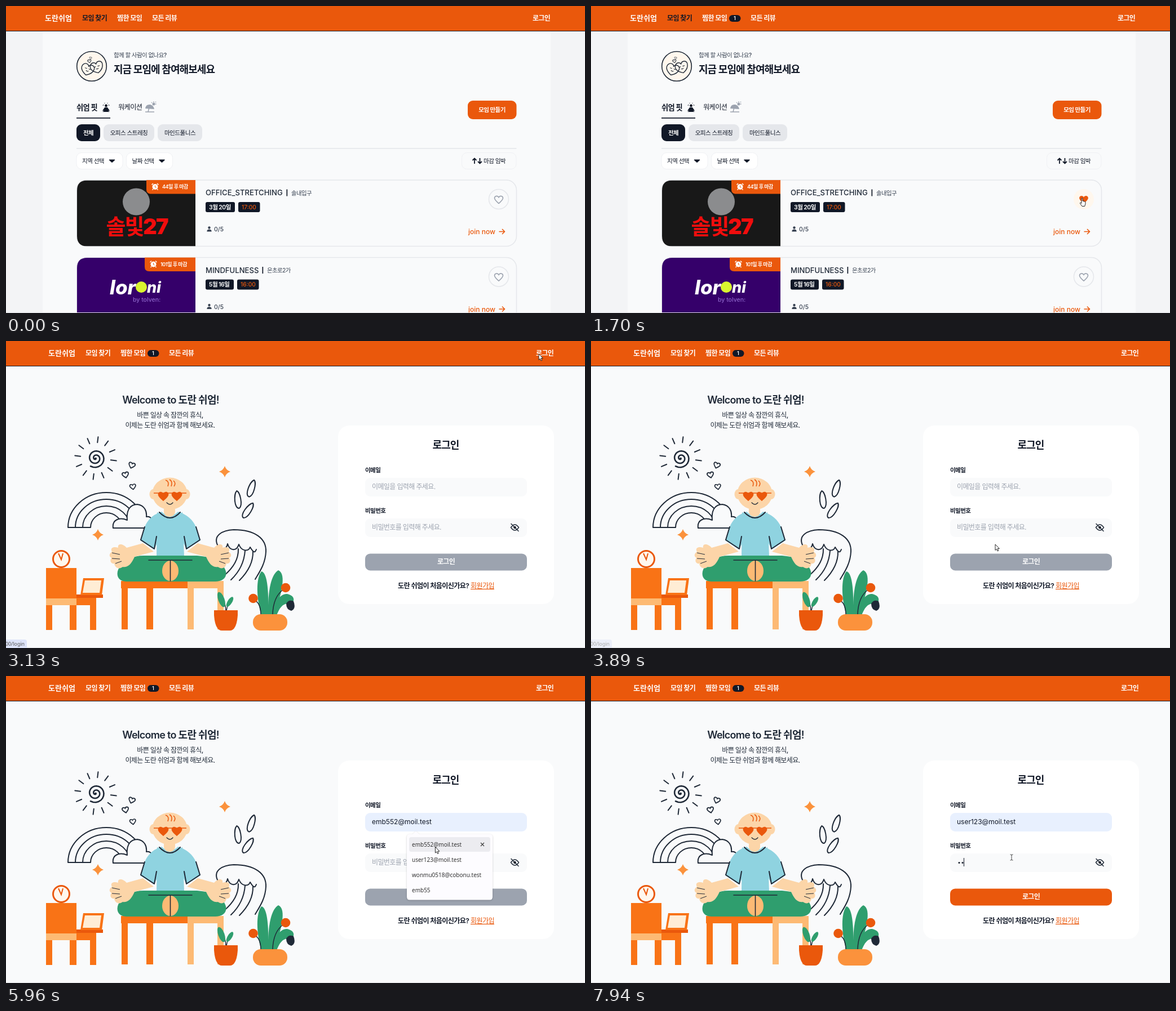
These frames come from a looping animation (1027x545 px, 8000 ms). An HTML page:

```html
<!DOCTYPE html>
<html lang="ko">
<head>
<meta charset="utf-8">
<style>
html, body { margin: 0; width: 100%; height: 100%; overflow: hidden; background: #f9fafb }
svg { display: block; width: 1027px; height: 545px }
text { font-family: Inter, "Noto Sans CJK KR", "Noto Sans CJK", sans-serif; white-space: pre }
.ui { font-family: "Noto Sans", sans-serif }
.line { fill: none; stroke: #1f2937; stroke-width: 2; stroke-linecap: round; stroke-linejoin: round }
</style>
</head>
<body>
<svg id="stage" viewBox="0 0 1027 545"></svg>
<script>
const INK = '#111827', ORANGE = '#ea580c', PALE = '#f9fafb', GREY = '#9ca3af', RULE = '#e5e7eb';
const SKIN = '#fcd5a8', GREEN = '#2f9e6e', AMBER = '#f97316', SAND = '#fdba74';
const LOOP = 8000;

// y is the optical middle of the line
const text = (x, y, size, str, fill = INK, weight = 500, extra = '') =>
  `<text x="${x}" y="${y + size * .36}" font-size="${size}" font-weight="${weight}" fill="${fill}"
    ${/[가-힣]/.test(str) ? `letter-spacing="${/Welcome/.test(str) ? -.04 : -.052}em"` : ''} ${extra}>${str}</text>`;
const mid = 'text-anchor="middle"';
const box = (x, y, x2, y2, r, fill, extra = '') =>
  `<rect x="${x}" y="${y}" width="${x2 - x}" height="${y2 - y}" rx="${r}" fill="${fill}" ${extra}/>`;
const disc = (x, y, r, fill, extra = '') => `<circle cx="${x}" cy="${y}" r="${r}" fill="${fill}" ${extra}/>`;
const oval = (x, y, rx, ry, fill, turn = 0) =>
  `<ellipse rx="${rx}" ry="${ry}" fill="${fill}" transform="translate(${x} ${y}) rotate(${turn})"/>`;
const path = (d, fill, extra = '') => `<path d="${d}" fill="${fill}" ${extra}/>`;
const line = (d, extra = '') => `<path class="line" d="${d}" ${extra}/>`;
const group = (id, body, extra = '') => `<g id="${id}" ${extra}>${body}</g>`;
const at = (x, y, body, more = '') => `<g transform="translate(${x} ${y}) ${more}">${body}</g>`;

const HEART = 'M0 6.5C-4 3-7.5 0-7.5-3C-7.5-7-2-8 0-4.3C2-8 7.5-7 7.5-3C7.5 0 4 3 0 6.5Z';
const heart = (x, y, scale, turn, extra) =>
  at(x, y, `<path d="${HEART}" ${extra}/>`, `rotate(${turn}) scale(${scale})`);
const outline = `fill="none" stroke="#1f2937" stroke-width="2.4"`;

function header() {
  return box(0, 0, 1027, 44, 0, ORANGE) + box(0, 44, 1027, 45, 0, INK) + group('nav',
    text(69, 21, 13, '도란쉬엄', '#fff', 900, 'style="letter-spacing:0"') +
    text(135, 22, 12, '모임 찾기', INK, 600, 'id="current"') +
    text(197, 22, 12, '찜한 모임', '#fff', 600) +
    group('count', box(245, 16, 265.5, 28, 6, INK) + text(255, 22, 9, '1', '#fff', 600, mid)) +
    group('reviews', text(259, 22, 12, '모든 리뷰', '#fff', 600)) +
    text(934, 22, 12, '로그인', '#fff', 600));
}

function alarm(x, y) {
  return at(x, y, disc(0, .5, 5, '#fff') + path('M-6-3L-3.5-5.5M6-3L3.5-5.5M-3.5 4.5L-5 6M3.5 4.5L5 6', 'none',
    'stroke="#fff" stroke-width="1.5"') + path('M0-2V1L2 2', 'none', `stroke="${ORANGE}"`));
}

function card(y, clip, art, badgeX, days, title, barX, place, date, hour, chipX, heartId) {
  return at(0, y,
    box(125.5, .5, 905.5, 118, 18, PALE, `stroke="${RULE}" stroke-width="1.5"`) +
    `<clipPath id="${clip}"><path d="M336 1H144Q126 1 126 19V100Q126 118 144 118H336Z"/></clipPath>` +
    `<g clip-path="url(#${clip})">${art}</g>` +
    path(`M336 .5V25H${badgeX + 8}Q${badgeX} 25 ${badgeX} 17V.5Z`, ORANGE) +
    alarm(badgeX + 15.5, 12) + text(badgeX + 28, 12.5, 9, days, '#fff', 600) +
    text(354, 23, 13.1, title, '#1f2937') +
    box(barX, 17, barX + 1.7, 29, 0, INK) + text(barX + 8.5, 23.5, 10.4, place, '#374151', 400) +
    box(354, 39.5, chipX - 6, 57.5, 3, INK) + text(360, 48.5, 10.5, date, '#fff', 600) +
    box(chipX, 39.5, chipX + 38.5, 57.5, 3, INK) + text(chipX + 6, 48.5, 10.2, hour, ORANGE) +
    disc(360.5, 85, 2.2, '#374151') + path('M356.5 92V90.5Q357 88 360.5 88T364.5 90.5V92Z', '#374151') +
    text(369, 88, 10.5, '0/5', '#374151') +
    text(820, 92.5, 12, 'join now', ORANGE) +
    path('M874.5 92H884M880 87.5L884.5 92L880 96.5', 'none', `stroke="${ORANGE}" stroke-width="1.5"`) +
    group(heartId, disc(874, 34.5, 17.5, PALE, `stroke="${RULE}" stroke-width="1.5"`) +
      heart(874, 35.5, 1, 0, `fill="none" stroke="${GREY}" stroke-width="1.6"`)));
}

function avatar() {
  const face = (x, y, turn) => at(x, y,
    line('M0 11C-8 7-13 2-11-4C-8-11-1-9 0-5C3-11 11-9 11-3C11 3 6 8 0 11Z', 'style="stroke-width:1.4"') +
    line('M-5-1Q-3.5 0-2-1M2-1Q3.5 0 5-1M-2 3Q0 5 2 3', 'style="stroke-width:1"'), `rotate(${turn})`);
  return disc(152, 107, 26.3, '#fff7ed', 'stroke="#1f2937" stroke-width="1.6"') +
    face(145, 112, 18) + face(161, 108, -16) +
    heart(148, 98, .42, -12, outline) + heart(150, 92.5, .28, 12, outline);
}

function listPage() {
  const shipArt = box(126, 0, 336, 119, 0, '#181818') + disc(231, 39, 24, '#8b8c8e') +
    text(232, 83, 38, '솔빛27', '#f00d0d', 900, mid);
  const boltArt = box(126, 0, 336, 119, 0, '#35006a') +
    text(184, 53, 35, 'lor', '#fff', 800, 'font-style="italic"') + disc(240, 53, 10, '#d9f52f') +
    text(250, 53, 27, 'ni', '#fff', 800, 'font-style="italic"') + text(225, 75.5, 10.5, 'by tolven:', '#8c62c9');
  const caretDown = x => path(`M${x - 4.5} 273.2H${x + 4.5}L${x} 277.2Z`, INK, `stroke="${INK}" stroke-width="1.6" stroke-linejoin="round"`);
  const select = (x, label) => box(x, 260.5, x + 82, 289.5, 9, '#fff', 'stroke="#f0f1f4"') +
    text(x + 10, 275, 10.6, label) + caretDown(x + 63);
  return box(0, 45, 1027, 545, 0, '#f3f4f6') + box(65, 45, 966, 545, 0, PALE) + avatar() +
    text(191, 87, 10.5, '함께 할 사람이 없나요?', '#374151') +
    text(191, 113, 18, '지금 모임에 참여해보세요', INK, 600) +
    text(125, 180, 13.2, '쉬엄 핏', INK, 600) + box(125, 198, 185, 199.7, 0, INK) +
    // meditating figure
    disc(177.5, 177, 2.4, INK) + path('M175 180H180L184 186H181L184 188H171L174 186H171Z', INK) +
    path('M172 177L173 175M175 173V172M180 173V172M183 177L182 175', 'none', `stroke="${INK}"`) +
    text(199, 180, 12.2, '워케이션') +
    // beach parasol
    path('M247 182Q248 174 256 175Q262 177 263 183Z', GREY) + disc(262, 174, 2.5, GREY) +
    path('M254 180L252 188M247 188H263M262 169.5V171M266.5 174H265M258 171L259 172M266 170L265 171', 'none', `stroke="${GREY}" stroke-width="1.5"`) +
    box(819, 168, 905.5, 201, 9, ORANGE) + text(862, 184.5, 10.5, '모임 만들기', '#fff', 600, mid) +
    box(125, 210, 167, 240, 9, INK) + text(146, 225, 10.5, '전체', '#fff', 600, mid) +
    box(173, 210, 263, 240, 9, RULE) + text(218, 225, 10.6, '오피스 스트레칭', INK, 500, mid) +
    box(269, 210, 348, 240, 9, RULE) + text(308.5, 225, 10.6, '마인드풀니스', INK, 500, mid) +
    box(125, 252, 905.5, 253.6, 0, RULE) +
    select(125, '지역 선택') + select(213.5, '날짜 선택') +
    box(808.5, 260.5, 905, 289.5, 9, PALE, 'stroke="#f0f1f4"') +
    path('M831 280V270.5M827.5 274L831 270.5L834.5 274M840.5 270V279.5M837 276L840.5 279.5L844 276', 'none', `stroke="${INK}" stroke-width="1.8"`) +
    text(847, 275, 10.6, '마감 임박') +
    card(308.5, 'clipA', shipArt, 249, '44일 후 마감', 'OFFICE_STRETCHING', 497.5, '솔내입구', '3월 20일', '17:00', 412, 'heartA') +
    card(446, 'clipB', boltArt, 246, '101일 후 마감', 'MINDFULNESS', 454.5, '은초로2가', '5월 16일', '16:00', 410, 'heartB') +
    group('liked', disc(874, 343, 18, '#fff7ed') + heart(874, 344, 1.05, 0, `fill="${ORANGE}"`));
}

function doodles() {
  let rays = '', spiral = 'M158 209';
  for (let i = 0; i < 12; i++) {
    const a = i * Math.PI / 6 + .12, c = Math.cos(a), s = Math.sin(a);
    rays += `M${159 + 27 * c} ${208 + 28 * s}L${159 + 37 * c} ${208 + 38 * s}`;
  }
  for (let a = 0; a < 15; a += .3) spiral += `L${159 + 1.15 * a * Math.cos(a)} ${208 + 1.15 * a * Math.sin(a)}`;
  const arcs = [68, 55, 42, 28].map((r, i) =>
    `M${178 - r} 331A${r} ${62 - 12 * i} 0 0 1 ${178 + r} 331`).join('');
  const star = (x, y) => at(x, y, path('M0-10Q2.5-2.5 10 0Q2.5 2.5 0 10Q-2.5 2.5-10 0Q-2.5-2.5 0-10Z', '#fb923c'));
  const drop = (x, y, turn) => at(x, y, line('M-1-16C5-14 9 10 2 15C-7 16-7-10-1-16Z'), `rotate(${turn})`);
  return line(rays) + line(spiral, 'style="stroke-width:2.6"') +
    heart(223, 221, .75, 18, outline) + heart(212, 238, .75, -12, outline) + heart(225, 259, .7, -8, outline) +
    line(arcs + 'M110 331H150') +
    line('M190 332C188 318 200 312 215 318C213 298 222 290 233 290C246 292 250 302 249 312C258 310 264 322 262 332Z', `style="fill:${PALE}"`) +
    star(388, 232) + star(163, 344) + drop(411, 282, -3) + drop(435, 262, 22) + drop(429, 301, 38) +
    line('M376 364C366 345 384 336 404 335C442 335 462 351 461 374C460 396 449 411 442 423M376 364C384 370 391 371 393 360C397 373 409 374 413 361C418 374 430 374 433 366C438 374 441 378 444 370') +
    line('M412 369Q413 395 386 417M424 372Q422 402 399 424M438 373Q439 400 414 425');
}

function meditator() {
  const hand = path('M243 359L214 367C206 358 197 360 199 367C190 364 184 368 188 374C182 378 183 383 187 385C183 391 187 396 192 395C193 403 201 406 207 401C219 403 225 390 228 383L262 374Z', SKIN) +
    path('M188 376L202 379M188 386L202 387M194 395L205 391', 'none', 'stroke="#1f2937" stroke-width="1"');
  const hands = hand + at(583, 0, hand, 'scale(-1 1)');
  return path('M268 304Q291 316 313 304L316 382H267Z', '#8fd3e0') +
    path('M276 303Q254 310 246 330L238 354L263 370L273 348H310L320 370L345 354L337 330Q328 310 305 303Q291 317 276 303Z', '#8fd3e0') +
    box(280, 290, 300, 312, 9, SKIN) + oval(261, 272, 6.5, 9, SKIN) + oval(320, 272, 6.5, 9, SKIN) +
    oval(290.5, 271, 31, 28.5, SKIN) +
    path('M283 247Q290 249 287 258M290 246Q296 249 293 258M297 248Q302 252 298 258', 'none', `stroke="${ORANGE}" stroke-width="1.5"`) +
    path('M262 270H320', 'none', `stroke="${ORANGE}" stroke-width="1.5"`) +
    heart(279, 276, 1.25, 0, `fill="${ORANGE}"`) + heart(303, 276, 1.25, 0, `fill="${ORANGE}"`) +
    line('M285 287Q291 293 296 287', 'style="stroke-width:1.3"') +
    line('M272 304Q291 324 309 304M246 330L239 353L263 369L267 347M337 330L344 353L320 369L316 347') +
    path('M244 381H339C362 383 378 389 387 402C396 417 386 427 371 427H213C196 427 193 410 204 398C214 388 226 381 244 381Z', GREEN) +
    hands + oval(291.5, 408, 14.5, 18, SAND) + line('M253 389H330M291.5 390V426', 'style="stroke-width:1.6"');
}

function furniture() {
  const bars = (fill, list) => list.map(([x, y, x2, y2]) => box(x, y, x2, y2, 0, fill)).join('');
  const orangeBars = [[204, 426, 322, 439], [205, 439, 216, 512], [249, 439, 261, 512], [71, 403, 125, 457],
    [71, 469, 82, 513], [113, 469, 125, 513], [125, 456, 160, 469], [149, 469, 160, 513]];
  return bars(AMBER, orangeBars) +
    bars(SAND, [[322, 426, 386, 439], [322, 439, 333, 512], [375, 439, 386, 512], [71, 457, 125, 469]]) +
    box(125, 450, 172, 456, 0, ORANGE) +
    path('M137 421H174L170 451H132Z', AMBER) + path('M140 425H169L166 447H136Z', '#ffedd5') +
    disc(98, 387, 14.5, '#fff7ed', `stroke="${ORANGE}" stroke-width="3"`) +
    path('M93 377L98 388L101 377', 'none', `stroke="${ORANGE}" stroke-width="2"`) +
    line('M390 480Q390 465 382 455M391 479Q393 465 400 459', 'style="stroke-width:1.5"') +
    oval(382, 459, 5.5, 14, GREEN, -20) + oval(397, 463, 4, 10, GREEN, 32) +
    path('M369 478H411V487Q409 514 397 514H383Q371 514 369 487Z', ORANGE) +
    path('M453 487C444 458 443 421 453 409C465 411 466 453 465 487Z', GREEN) +
    path('M465 487C464 440 471 414 483 407C498 413 489 452 474 487Z', GREEN) +
    path('M472 486C475 461 490 445 502 450C514 454 511 464 505 468C494 463 486 471 480 487Z', GREEN) +
    path('M497 466Q502 458 510 462Q515 475 506 479Q497 477 497 466Z', '#1f2937') +
    line('M452 486Q452 466 441 460M473 485Q474 454 492 441', 'style="stroke-width:1.5"') +
    disc(438.5, 457, 8.3, ORANGE) + disc(496, 438, 8.3, ORANGE) + box(438, 485, 499, 514, 14, '#fb923c');
}

function loginPage() {
  return box(0, 45, 1027, 545, 0, PALE) +
    text(292, 105, 18, 'Welcome to 도란 쉬엄!', '#1f2937', 600, mid) +
    text(291, 132, 12, '바쁜 일상 속 잠깐의 휴식,', '#1f2937', 500, mid) +
    text(291, 150, 12, '이제는 도란 쉬엄과 함께 해보세요.', '#1f2937', 500, mid) +
    doodles() + furniture() + meditator() +
    box(589, 150, 972, 467, 20, '#fff') + text(780, 185, 18, '로그인', INK, 600, mid) +
    text(637, 229, 10.5, '이메일', INK, 600) + text(637, 301, 10.5, '비밀번호', INK, 600) +
    box(637, 243, 924, 276, 9, PALE, 'id="emailBox"') + box(637, 315, 924, 348, 9, PALE) +
    text(649, 259, 12, '이메일을 입력해 주세요.', GREY, 400, 'id="emailHint"') +
    text(649, 259, 12, '', INK, 400, 'id="email"') +
    text(649, 331, 12, '비밀번호를 입력해 주세요.', GREY, 400, 'id="passHint"') +
    disc(653, 331.5, 1.5, INK, 'id="dot1"') + disc(659, 331.5, 1.5, INK, 'id="dot2"') +
    line('M895.5 331Q902.5 321 909.5 331Q902.5 341 895.5 331ZM896 324.5L909 337.5', 'style="stroke-width:1.5"') +
    disc(902.5, 331, 2.3, INK) +
    box(637, 377.4, 924, 407.4, 9, GREY, 'id="submit"') + text(780.5, 392, 12, '로그인', '#fff', 600, mid) +
    text(695, 434.5, 12.1, '도란 쉬엄이 처음이신가요?', INK, 600) +
    text(824, 434.5, 12.1, '회원가입', ORANGE, 500, 'text-decoration="underline"') +
    box(649, 251, 650, 266, 0, INK, 'id="caret"');
}

const accounts = ['emb552@moil.test', 'user123@moil.test', 'wonmu0518@cobonu.test', 'emb55'];

function dropdown() {
  return path('M711 286Q711 281 716 281H721L727 275.5L733 281H858Q863 281 863 286V392Q863 397.5 858 397.5H716Q711 397.5 711 392Z',
    '#fdfcff', 'style="filter:drop-shadow(0 1px 1.5px #0003)"') +
    group('row', box(715, 286, 859, 312, 4, '#ececf0') +
      path('M842 296L848 302M848 296L842 302', 'none', 'stroke="#444" stroke-width="1.3"')) +
    accounts.map((name, i) => text(720, 299 + 27 * i, 10, name, '#333', 400, 'class="ui"')).join('');
}

const pointers =
  group('arrow', path('M0 0V10.5L2.4 8.3L4 12L5.8 11.2L4.2 7.6H7.4Z', '#fff', 'stroke="#111" stroke-width=".9"')) +
  group('hand', path('M3 8V1.5Q4 0 5 1.5V6L8.5 7Q10 7.3 10 9V11L8.7 15.5H4L.5 10.5Q0 8.8 1.7 9.2L3 10.5Z', '#fff', 'stroke="#111" stroke-width=".9"')) +
  group('beam', path('M.5.5H2L3 1.5L4 .5H5.5M3 1.5V9.5M.5 10.5H2L3 9.5L4 10.5H5.5', 'none', 'stroke="#333" stroke-width=".9"'));

document.getElementById('stage').innerHTML =
  group('list', listPage()) + group('login', loginPage()) + header() + box(0, 544, 1027, 545, 0, '#dfe0e3') +
  group('status', path('M0 530H33Q37 530 37 534V545H0Z', '#dde3f8') +
    text(-1, 538, 8.8, '00/login', '#555', 400, 'class="ui"')) +
  group('menu', dropdown()) + group('pointer', pointers);

const $ = id => document.getElementById(id);
const show = (id, on) => { $(id).style.display = on ? '' : 'none'; };
const move = (id, x, y) => $(id).setAttribute('transform', `translate(${x} ${y})`);
const within = (t, a, b) => t >= a && t < b;
const ramp = (t, a, b) => Math.min(1, Math.max(0, (t - a) / (b - a)));

// time, x, y of the pointer
const trail = [[330, 975, 473], [640, 840, 400], [800, 822, 370], [1100, 874, 340], [1240, 867, 340], [2160, 867, 340],
  [2480, 945, 23], [3480, 945, 23], [3890, 717, 361], [4280, 740, 250], [4410, 730, 254.5], [5470, 730, 254.5],
  [5680, 765, 300], [5820, 765, 300], [6360, 744, 321], [6680, 744, 321], [6870, 743, 316.5]];

function pointerAt(t) {
  const next = trail.findIndex(p => p[0] > t);
  if (next < 0) return trail[trail.length - 1].slice(1);
  if (next === 0) return trail[0].slice(1);
  const [t0, x0, y0] = trail[next - 1], [t1, x1, y1] = trail[next];
  const k = ramp(t, t0, t1), e = k * k * (3 - 2 * k);
  return [x0 + (x1 - x0) * e, y0 + (y1 - y0) * e];
}

function draw(t) {
  const onLogin = t >= 3130, liked = t >= 1700;
  const [px, py] = pointerAt(t);
  show('list', !onLogin);
  show('login', onLogin);
  move('nav', onLogin ? 6 : 0, 0);
  $('current').setAttribute('fill', onLogin ? '#fff' : INK);
  show('count', liked);
  move('reviews', liked ? 24 : 0, 0);
  show('heartA', !liked);
  show('liked', liked);
  $('status').style.opacity = ramp(t, 2620, 2810) * (1 - ramp(t, 3790, 3990));

  const filled = t >= 5540;
  const hovered = py > 312.5 ? 1 : 0;
  const leaving = ramp(t, 6560, 6790);
  $('menu').style.opacity = ramp(t, 4810, 4930) * (1 - leaving);
  $('menu').setAttribute('transform', `translate(787 340) scale(${1 - .025 * leaving}) translate(-787 -340)`);
  show('row', filled);
  move('row', 0, 27 * hovered);
  show('emailHint', !filled);
  $('email').textContent = filled ? accounts[hovered] : '';
  $('emailBox').setAttribute('fill', filled ? '#e8f0fe' : PALE);

  const dots = t >= 7940 ? 2 : t >= 7790 ? 1 : 0;
  show('passHint', !dots);
  show('dot1', dots > 0);
  show('dot2', dots > 1);
  $('submit').setAttribute('fill', dots ? ORANGE : GREY);
  show('caret', within(t, 4600, 5200) || within(t, 6600, 7210) || t >= 7460);
  move('caret', t >= 7460 ? dots * 6 : t >= 6600 ? 106 : 0, t >= 7460 ? 72 : 0);

  const beam = within(t, 4340, 5520) || t >= 6780;
  const hand = within(t, 1000, 2230);
  show('pointer', t >= 330);
  show('beam', beam);
  show('hand', hand);
  show('arrow', !beam && !hand);
  move('pointer', px, py);
}

function tick() {
  draw(performance.now() % LOOP);
  requestAnimationFrame(tick);
}
tick();
</script>
</body>
</html>
```
